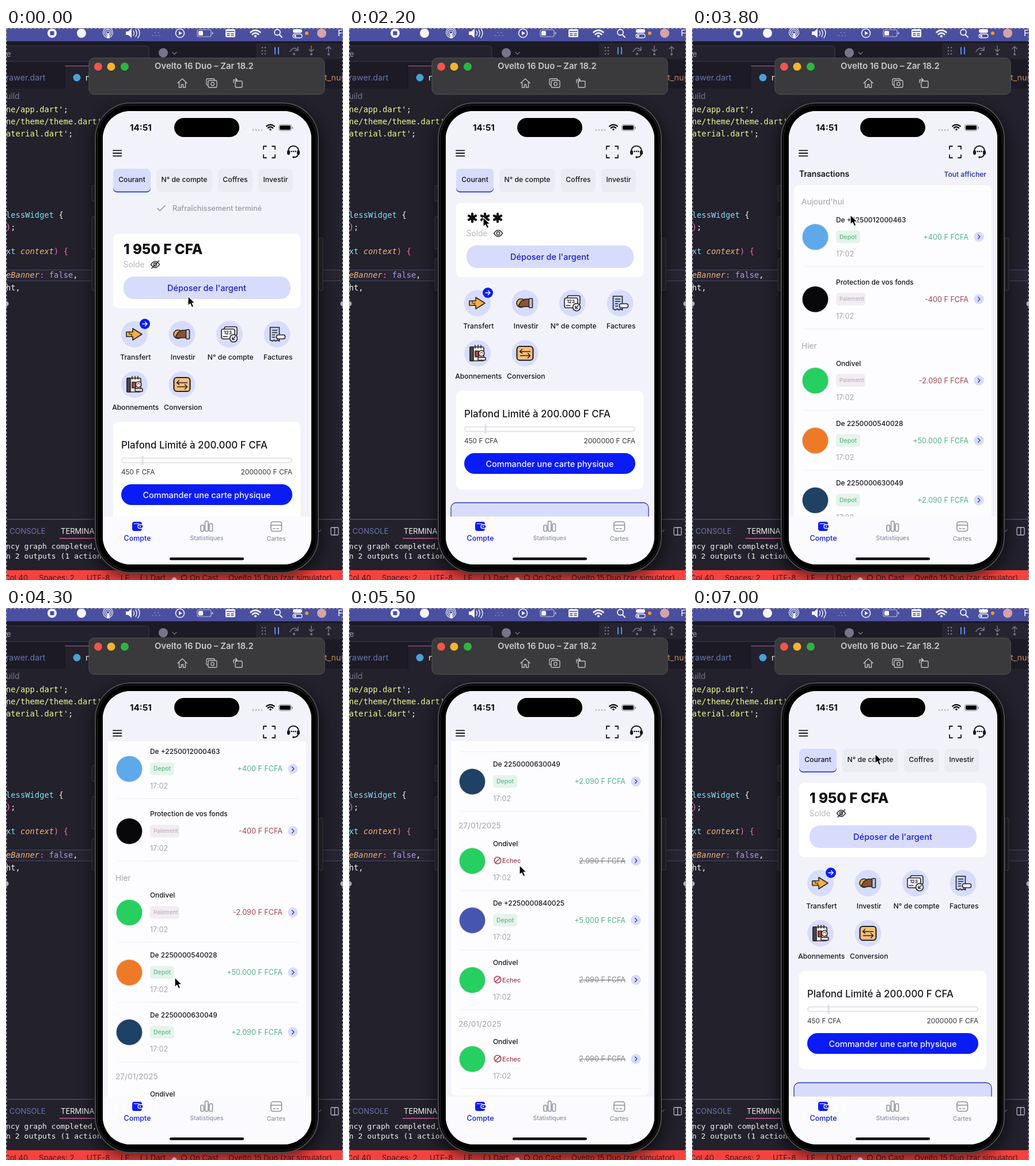
An HTML page for the animation above (7100 ms loop, 585 by 957 pixels).

```html
<!DOCTYPE html>
<html lang="fr">
<head>
<meta charset="utf-8">
<title>Application bancaire</title>
<style>
html, body { margin: 0; width: 100%; height: 100%; overflow: hidden; background: #22212c; }
svg { display: block; width: 100vw; height: 100vh; font-family: Inter, sans-serif; }
.mono { font-family: "DejaVu Sans Mono", monospace; white-space: pre; }
</style>
</head>
<body>
<svg id="stage" viewBox="0 0 585 957" xmlns="http://www.w3.org/2000/svg"></svg>
<script>
const LOOP = 7100;
const BG = '#f2f3fa', LAV = '#d8dcfc', BLUE = '#0a1cf5', INK = '#17171c';
const LIST_TOP = 960;

// ---- markup helpers ----
const rect = (x, y, w, h, r, fill, more = '') =>
  `<rect x="${x}" y="${y}" width="${w}" height="${h}" rx="${r}" fill="${fill}" ${more}/>`;
const disc = (x, y, r, fill, more = '') => `<circle cx="${x}" cy="${y}" r="${r}" fill="${fill}" ${more}/>`;
const line = (d, color, w = 1.5, more = '') =>
  `<path d="${d}" fill="none" stroke="${color}" stroke-width="${w}" stroke-linecap="round" stroke-linejoin="round" ${more}/>`;
const shape = (d, fill, more = '') => `<path d="${d}" fill="${fill}" ${more}/>`;
const at = (x, y, inner) => `<g transform="translate(${x} ${y})">${inner}</g>`;
// y is the middle of the capitals
const text = (x, y, size, str, fill = INK, weight = 500, more = '') =>
  `<text x="${x}" y="${y + size * 0.36}" font-size="${size}" font-weight="${weight}" fill="${fill}" ${more}>${str}</text>`;
const mid = (x, y, size, str, fill, weight) => text(x, y, size, str, fill, weight, 'text-anchor="middle"');
const code = (y, parts, size = 13.8) =>
  `<text class="mono" x="0" y="${y + size * 0.34}" font-size="${size}">` +
  parts.map(([s, c, i]) => `<tspan fill="${c}"${i ? ' font-style="italic"' : ''}>${s}</tspan>`).join('') + '</text>';
const wifi = (x, y, s, c) => at(x, y, `<g transform="scale(${s})">` +
  line('M-8 -2.5Q0 -9 8 -2.5M-5 1Q0 -3.5 5 1', c, 2.6) + disc(0, 4, 2, c) + '</g>');

// ---- editor behind the phone ----
function menuBar() {
  const w = '#f3f3fa';
  return rect(0, 0, 585, 23, 0, '#4a4f9f') +
    disc(80, 9, 8, w) + rect(76.5, 5.5, 7, 7, 1, '#4a4f9f') +
    disc(131, 9, 8, w) +
    [3, 5.8, 8.5].map(r => disc(177, 8, r, 'none', `stroke="${w}" stroke-width="1.2"`)).join('') +
    shape('M176 9h3l1 9h-5z', w) +
    shape('M208 6h4l6 -5v16l-6 -5h-4z', w) + line('M221 5q3 4 0 8M225 3q4 6 0 12M229 1q6 8 0 16', w, 1.4) +
    line('M254 13h18M258 8h10', '#7478b8', 2, 'stroke-dasharray="1 5"') +
    disc(302, 9, 7.5, 'none', `stroke="${w}" stroke-width="1.6"`) + shape('M300 5.5l6 3.5l-6 3.5z', w) +
    rect(332, 3, 24, 12, 3, 'none', 'stroke="#b9bbe0" stroke-width="1.2"') + rect(334, 5, 8, 8, 1.5, w) +
    rect(357.5, 7, 2, 4, 1, '#b9bbe0') +
    rect(381, 2, 17, 14, 2, w) + line('M383 6h13M384 10h4M391 10h4M384 13h4M391 13h4', '#4a4f9f', 1.4) +
    wifi(433, 10, 1.05, w) +
    disc(471, 7.5, 5, 'none', `stroke="${w}" stroke-width="1.8"`) + line('M475 12l4 4', w, 2) +
    rect(498, 2, 16, 6.5, 3.2, w) + rect(498, 10.5, 16, 6.5, 3.2, 'none', `stroke="${w}" stroke-width="1.3"`) +
    disc(502, 13.7, 2, w) + disc(522, 9, 3, '#f19a38') +
    disc(548, 9, 8, '#d6a3a8') + text(576, 9, 14, 'F', w);
}

function editor() {
  const gray = '#8e8da3', yel = '#f1fa8c', cy = '#86dcf0', or = '#f4b277', pk = '#ef6fae', wh = '#f4f4ee', pu = '#b393ee';
  const tool = '#77758a';
  return rect(0, 0, 585, 957, 0, '#22212c') +
    rect(0, 22, 585, 43, 0, '#1b1a25') + rect(-8, 31, 256, 27, 5, '#22212d', 'stroke="#3b3a4a"') +
    text(1, 45, 13, 'e', gray) +
    disc(273, 43, 8, '#77758a') + line('M289 42l3.5 3.5l3.5 -3.5', tool, 1.2) +
    rect(434, 26, 151, 28, 4, '#25242f') +
    [445, 450].map(x => [34, 39.5, 45].map(y => disc(x, y, 1.3, tool)).join('')).join('') +
    line('M467 34v11M473 34v11', '#5b8ff0', 2) +
    line('M493 41q7 -11 14 -2M507 33v6h-6', tool) + disc(500, 45, 2, tool) +
    line('M530 31v10M526 37l4 4l4 -4', tool) + disc(530, 45.5, 2, tool) +
    line('M560 42v-10M556 36l4 -4l4 4', tool) + disc(560, 45.5, 2, tool) +
    rect(0, 65, 585, 40, 0, '#1b1a25') + rect(102, 65, 400, 40, 0, '#22212c') +
    rect(102, 65, 400, 1.5, 0, '#87486f') + line('M102 66V105', '#15141d', 1) +
    text(0, 86, 14.2, 'rawer.dart', '#6b76ad', 400) +
    disc(123, 86, 6.5, '#4b9fd8') + text(138, 86, 14.2, 'nu', wh, 400) + text(553, 86, 14.2, 't_nu(', '#c9895a', 400) +
    text(0, 118, 14, 'uild', '#77768b', 400) +
    rect(-2, 419.5, 590, 19, 0, '#262530', 'stroke="#4a4869"') +
    code(141, [["ne/app.dart'", yel], [';', wh]]) +
    code(162, [["ne/theme/theme.dart'", yel], [';', wh]]) +
    code(183, [["aterial.dart'", yel], [';', wh]]) +
    code(324, [['lessWidget', cy], [' {', wh]]) +
    code(345, [[')', pk], [';', wh]]) +
    code(387, [['xt ', cy], ['context', or, 1], [') {', pk]]) +
    code(428, [['eBanner', or, 1], [': ', pk], ['false', pu], [',', wh]]) +
    code(450, [['ht,', wh]]) +
    rect(0, 851, 585, 1.5, 0, '#63416a') +
    text(6, 872, 13, 'CONSOLE', '#6b76ad', 400) + text(95, 872, 13, 'TERMINAL', wh, 400) +
    rect(93, 884, 66, 1.5, 0, '#c45d90') +
    code(899, [['ncy graph completed,', wh]], 13.1) + code(916, [['n 2 outputs (1 action', wh]], 13.1) +
    line('M541 870l3 3l3 -3', tool, 1.2) + rect(564, 866, 13, 13, 1.5, 'none', 'stroke="#b9b8c8" stroke-width="1.3"') +
    line('M570.5 866v13', '#b9b8c8', 1.3) +
    rect(0, 940, 585, 17, 0, '#f5423f') +
    [[-3, 'Col 40'], [57, 'Spaces: 2'], [140, 'UTF-8'], [199, 'LF'], [232, '{ } Dart'], [319, 'On Cast'],
     [386, 'Ovelto 15 Duo (zar simulator)']].map(([x, s]) => text(x, 953, 13.2, s, '#521414', 400)).join('') +
    disc(309, 953, 4.5, 'none', 'stroke="#521414" stroke-width="1.3"');
}

function frameMarks() {
  const dash = d => line(d, '#a5a4b4', 1.5, 'stroke-dasharray="3 4" stroke-linecap="butt"');
  return dash('M.7 0V957') + dash('M584.3 0V957') + dash('M0 .7H585') +
    [[0, 478], [585, 478], [292, 957]].map(([x, y]) => disc(x, y, 4.5, '#b4b3bd', 'stroke="#77768a"')).join('');
}

function windowBar() {
  const c = '#c3c2c4';
  return rect(144, 52, 409, 63, 9, '#3a393b', 'stroke="#555457"') +
    disc(160, 67, 7, '#f2544f') + disc(182.5, 67, 7, '#f6b32f') + disc(206, 67, 7, '#2bb640') +
    text(258, 66, 14.9, 'Ovelto 16 Duo – Zar 18.2', '#cac9cb', 600) +
    line('M298 95.5l8 -7.5l8 7.5M300.5 94v9h4v-5h3v5h4v-9', c, 1.4) +
    rect(348, 88, 14, 11, 2, 'none', `stroke="${c}" stroke-width="1.3"`) +
    rect(351, 91, 15, 12, 2, '#3a393b', `stroke="${c}" stroke-width="1.3"`) +
    disc(358.5, 97, 2.8, 'none', `stroke="${c}" stroke-width="1.3"`) +
    rect(398, 92, 12, 11, 1.5, 'none', `stroke="${c}" stroke-width="1.4"`) +
    line('M395 95v-5h6M398.5 87l3 3l-3 3', c, 1.3);
}

// ---- phone ----
function shell() {
  const key = (x, y, h) => rect(x, y, 7, h, 2, '#1c1c21', 'stroke="#34343b"');
  return rect(150, 138, 397, 816, 66, '#000', 'opacity=".55" filter="url(#soft)"') +
    key(149, 273, 27) + key(149, 327, 56) + key(149, 400, 55) + key(543, 364, 91) +
    rect(155, 130, 387, 814, 62, '#000', 'stroke="#4b4b50" stroke-width="2"') +
    rect(158.5, 133.5, 380, 807, 58, 'none', 'stroke="#19191b" stroke-width="2"');
}

function header() {
  return rect(168, 144, 362, 87, 0, BG) +
    text(215, 173, 15.2, '14:51', '#0c0c10', 700) + rect(292, 156, 113, 33, 16.5, '#000') +
    [429, 434, 439, 444].map(x => disc(x, 177, 1.4, '#b5b6be')).join('') + wifi(459, 172.5, 0.85, '#000') +
    rect(473.5, 167.5, 22, 10.5, 3.4, 'none', 'stroke="#8b8b90"') + rect(475, 169, 19, 7.5, 2, '#000') +
    rect(496.5, 171, 1.6, 4, 0.8, '#8b8b90') +
    line('M186 212.3h14.5M186 217h14.5M186 221.8h14.5', INK, 1.8) +
    line('M447 210v-5h5M462 205h5v5M467 220v5h-5M452 225h-5v-5', INK, 1.8) +
    line('M490 215v-2a9 8.5 0 0 1 18 0v2M507 219q-1 5 -7 5', INK, 2) +
    rect(488, 212, 5, 8, 2.4, INK) + rect(505, 212, 5, 8, 2.4, INK) + disc(499, 224, 1.8, INK) +
    [495.5, 499, 502.5].map(x => disc(x, 214, 1.3, INK)).join('');
}

function nav() {
  const g = '#8e8fa6', s = `stroke="${g}" stroke-width="1.6"`;
  return rect(168, 847, 362, 84, 0, '#fbfbff') +
    rect(219, 856, 17, 16, 4, BLUE) + rect(229, 861, 9, 6.5, 3, BLUE, 'stroke="#fbfbff" stroke-width="1.3"') +
    disc(233, 864.2, 1.1, '#fff') + line('M222 859.5h9', '#fff', 1) +
    rect(338, 862, 5.5, 10.5, 1.5, 'none', s) + rect(345.5, 855, 5.5, 17.5, 1.5, 'none', s) +
    rect(353, 859.5, 5.5, 13, 1.5, 'none', s) +
    rect(460, 856, 18.5, 16.5, 3.5, 'none', s) + line('M460 862h18M464 868h3M470 868h3', g, 1.5) +
    mid(228, 884, 12.5, 'Compte', BLUE, 500) + mid(348.5, 884, 10.3, 'Statistiques', g, 500) +
    mid(469, 885, 10.3, 'Cartes', g, 500) + rect(284, 918, 129, 4.5, 2.2, '#000');
}

function tabs() {
  const list = [[186, 65, 'Courant'], [261, 97, 'N° de compte'], [368, 60, 'Coffres'], [438, 60, 'Investir']];
  return rect(168, 231, 362, 56, 0, BG) + list.map(([x, w, s], i) =>
    (i ? '' : rect(x, 247, w, 38, 7, BLUE)) +
    rect(x, 244, w, i ? 40.5 : 39.5, 7, i ? '#ebebf2' : LAV) + mid(x + w / 2, 262.5, 12.2, s, INK, 500)).join('');
}

const stk = 'stroke="#25232a" stroke-width="1.6" stroke-linejoin="round"';
const icons = {
  'Transfert': shape('M-14 -4h11v-6l16 10l-16 10v-6h-11z', '#f5b03d', stk) + line('M-9 -4v4h5M-5 4v-3', '#25232a', 1.2) +
    disc(18, -18, 9, BLUE) + line('M14 -18h8M18.5 -21.5l3.5 3.5l-3.5 3.5', '#fff', 1.4),
  'Investir': disc(-7, 0, 7.5, '#eab038', stk) + shape('M-7 -3l7 -4h8v13h-8q-9 2 -11 -2z', '#8c5330', stk) +
    rect(7, -8, 6, 16, 1, '#b9c3d2', stk),
  'N° de compte': rect(-9, -13, 22, 15, 3, '#e9ebf4', stk) + rect(-14, -9, 23, 17, 3, '#f8f8fb', stk) +
    mid(-3, -3, 8, '123', '#25232a', 700) + line('M-11 4h7', '#25232a', 1.4) +
    disc(7, 7, 6.5, '#e9ebf4', stk) + line('M10 4l-5 5M5 5v4h4', '#25232a', 1.3),
  'Factures': shape('M-12 -12h16v24l-3 -2l-3 2l-3 -2l-3 2l-4 -2z', '#c5d0f5', stk) +
    line('M-8 -7h8M-8 -3h8M-8 1h4M-8 5h4', '#25232a', 1.4) + rect(-1, 1, 15, 7, 3, '#edf0fb', stk),
  'Abonnements': rect(-13, -11, 24, 24, 2, '#fbf3e4', stk) + rect(-13, -11, 6, 24, 1, '#48474f', stk) +
    line('M-4 -14v5M1 -14v5M6 -14v5', '#25232a', 1.6) + rect(-4, -4, 6, 10, 0, '#b6443f', stk) +
    disc(7, 0, 5, '#f5f5f8', stk) + line('M4.5 0q2.5 -4 5 0', '#c95d48', 1.3) + rect(1, 7, 13, 5, 1, '#f2e2d2', stk),
  'Conversion': rect(-14, -12, 28, 24, 5, '#f6be74', stk.replace('1.6', '2.2')) +
    line('M9 -3h-18l4 -4M-9 -3l4 3M-8 4h17l-4 -4M9 4l-4 4', '#25232a', 1.6)
};

function star(x) {
  return at(x, 329, [0, 60, 120].map(a => line('M0 -7V7', '#0e0e12', 4.2, `transform="rotate(${a})" stroke-linecap="butt"`)).join(''));
}

function home() {
  const services = Object.keys(icons).map((name, i) => {
    const col = i % 4, y = 477 + 87 * Math.floor(i / 4), x = 223 + 82.5 * col;
    return disc(x, y, 23, LAV) + at(x, y, icons[name]) + mid(x + 1.8, y + 40, 12.2, name, INK, 500);
  }).join('');
  return `<g id="note">${line('M263 259l4 4l9 -9', '#8f8f96', 1.6)}${text(289, 258, 12.7, 'Rafraîchissement terminé', '#9a9aa1', 500)}</g>` +
    rect(186, 303, 325, 129, 9, '#fff') +
    `<g id="sum">${text(204, 329, 24.2, '1 950 F CFA', '#0e0e12', 800)}</g>` +
    `<g id="mask">${[214, 236, 258].map(star).join('')}</g>` +
    text(203.5, 356, 13.9, 'Solde', '#b9b9be', 400) +
    line('M251.5 356q7.5 -11 15 0q-7.5 11 -15 0z', '#2b2b31', 1.4) + disc(259, 356, 2.7, 'none', 'stroke="#2b2b31" stroke-width="1.4"') +
    `<g id="slash">${line('M253 362.5l12.5 -13', '#2b2b31', 1.5)}</g>` +
    rect(204, 377, 290, 39, 18, LAV) + mid(348.5, 397, 14.5, "Déposer de l'argent", '#1a1fd0', 500) + services +
    rect(186, 629, 325, 171, 9, '#fff') + text(200, 669, 16.9, 'Plafond Limité à 200.000 F CFA', INK, 500) +
    rect(201, 691.5, 295, 8, 4, '#fff', 'stroke="#e3e3e9" stroke-width="2"') + rect(235.5, 687, 3, 17, 1.5, '#dedee4') +
    text(200, 716, 11.8, '450 F CFA', '#33333a', 400) + text(497, 716, 12, '2000000 F CFA', '#33333a', 400, 'text-anchor="end"') +
    rect(200, 737, 297, 36, 18, BLUE) + mid(348.5, 755.5, 14.5, 'Commander une carte physique', '#f4f5ff', 500) +
    rect(177, 823, 343, 102, 9, LAV, 'stroke="#2c37b4" stroke-width="1.3"') + at(0, LIST_TOP, history());
}

// ---- transactions: y, avatar colour, title, amount, kind ----
function row([y, color, title, amount, kind]) {
  const c = y + 29.7;
  const tone = { dep: '#4fb287', pay: '#a83f4a', ko: '#85858b' }[kind];
  const tag = {
    dep: rect(250, c - 11, 42, 22, 5, '#e6f3eb') + text(256, c, 10.5, 'Depot', '#5cbb8e', 500),
    pay: rect(250, c - 11, 51, 22, 5, '#f1edf3') + text(256, c, 9.6, 'Paiement', '#c0b0ba', 500),
    ko: disc(258, c - 0.5, 5.8, 'none', 'stroke="#b13346" stroke-width="1.5"') + line('M254 ' + (c + 3.5) + 'l8 -8', '#b13346', 1.5) +
      text(266, c, 11, 'Echec', '#a03e50', 500)
  }[kind];
  return disc(214, c + 0.3, 23.5, '#e7eaee') + disc(214, c + 0.3, 22.3, color) + text(250, y, 11.9, title, INK, 500) + tag +
    text(250, y + 59.3, 12.6, '17:02', '#a5a5ab', 400) +
    text(480, c, 12.6, amount, tone, 400, `text-anchor="end"${kind === 'ko' ? ' text-decoration="line-through"' : ''}`) +
    disc(498, c, 8.7, LAV) + line(`M496.5 ${c - 3.5}l3.5 3.5l-3.5 3.5`, '#2b35c9', 1.3) +
    rect(250, y + 81, 257, 1, 0, '#ededf1') + rect(194, y + 81, 56, 1, 0, '#f0f0f4');
}

function history() {
  const green = '#26cf5f', shop = 'Ondivel', fail = '2.090 F FCFA';
  const rows = [
    [79, '#5da9ea', 'De +2250012000463', '+400 F FCFA', 'dep'],
    [187, '#08080a', 'Protection de vos fonds', '-400 F FCFA', 'pay'],
    [328, green, shop, '-2.090 F FCFA', 'pay'],
    [432, '#ee7a28', 'De 2250000540028', '+50.000 F FCFA', 'dep'],
    [535.5, '#1f4165', 'De 2250000630049', '+2.090 F FCFA', 'dep'],
    [673, green, shop, fail, 'ko'],
    [776, '#4656b0', 'De +2250000840025', '+5.000 F FCFA', 'dep'],
    [879.5, green, shop, fail, 'ko'],
    [1016.5, green, shop, fail, 'ko']
  ];
  const days = [[48, "Aujourd'hui"], [298, 'Hier'], [642, '27/01/2025'], [986, '26/01/2025']];
  return text(186, 0, 13.9, 'Transactions', INK, 600) + text(511, 0, 12.1, 'Tout afficher', '#1c27c4', 500, 'text-anchor="end"') +
    rect(177, 19, 343, 1091, 9, '#fdfdff') + days.map(([y, s]) => text(190, y, 13.7, s, '#a3a3aa', 400)).join('') +
    rows.map(row).join('');
}

const stage = document.getElementById('stage');
stage.innerHTML = `<defs><filter id="soft" x="-20%" y="-20%" width="140%" height="140%"><feGaussianBlur stdDeviation="12"/></filter>
  <clipPath id="screen">${rect(168, 144, 362, 786, 48, '#000')}</clipPath></defs>` +
  editor() + menuBar() + shell() +
  `<g clip-path="url(#screen)">${rect(168, 144, 362, 786, 0, BG)}<g id="body">${home()}</g><g id="tabs">${tabs()}</g>${header()}${nav()}</g>` +
  windowBar() + frameMarks() +
  `<g id="cursor">${shape('M0 0V16.5L3.9 13L6.6 19.2L9.6 17.9L7 11.9H12z', '#050505', 'stroke="#fff" stroke-width="1.1" stroke-linejoin="round"')}</g>`;

// ---- motion ----
const scrollKeys = [[0, -54], [300, -54], [800, 0], [2600, 0], [3100, 380], [3400, 420], [3900, 740], [4300, 790],
  [4800, 1146], [5400, 1224.5], [5700, 1224.5], [6100, -26], [6200, -19], [6500, 0]];
const pointKeys = [[0, 316, 465], [500, 316, 465], [1300, 252, 350], [1700, 250, 348], [2200, 233, 328], [2400, 250, 350],
  [2600, 274, 640], [3000, 275, 350], [3400, 275, 610], [3800, 275, 324], [4000, 277, 320], [4400, 296, 700], [4800, 296, 614],
  [5000, 296, 560], [5500, 296, 446], [5700, 300, 330], [6100, 314, 655], [6200, 314, 663], [6900, 318, 253]];

function sample(keys, t, k) {
  const i = keys.findIndex(key => key[0] > t);
  if (i < 0) return keys[keys.length - 1][k];
  const a = keys[i - 1], b = keys[i], p = (t - a[0]) / (b[0] - a[0]);
  return a[k] + (b[k] - a[k]) * p * p * (3 - 2 * p);
}

const el = id => document.getElementById(id);
const [body, tabRow, cursor, sum, mask, slash, note] = ['body', 'tabs', 'cursor', 'sum', 'mask', 'slash', 'note'].map(el);
const move = (node, x, y) => node.setAttribute('transform', `translate(${x.toFixed(2)} ${y.toFixed(2)})`);
const show = (node, on) => node.setAttribute('visibility', on ? 'visible' : 'hidden');

function draw(t) {
  const s = sample(scrollKeys, t, 1), hidden = t >= 1600 && t < 2400;
  move(body, 0, -s);
  move(tabRow, 0, -Math.max(0, s));
  move(cursor, sample(pointKeys, t, 1), sample(pointKeys, t, 2));
  show(sum, !hidden);
  show(slash, !hidden);
  show(mask, hidden);
  show(note, t < 1000);
}

const start = performance.now();
function tick() {
  const t = (performance.now() - start) % LOOP;
  draw(Math.floor(t / 100) * 100);
  requestAnimationFrame(tick);
}
draw(0);
requestAnimationFrame(tick);
</script>
</body>
</html>
```
